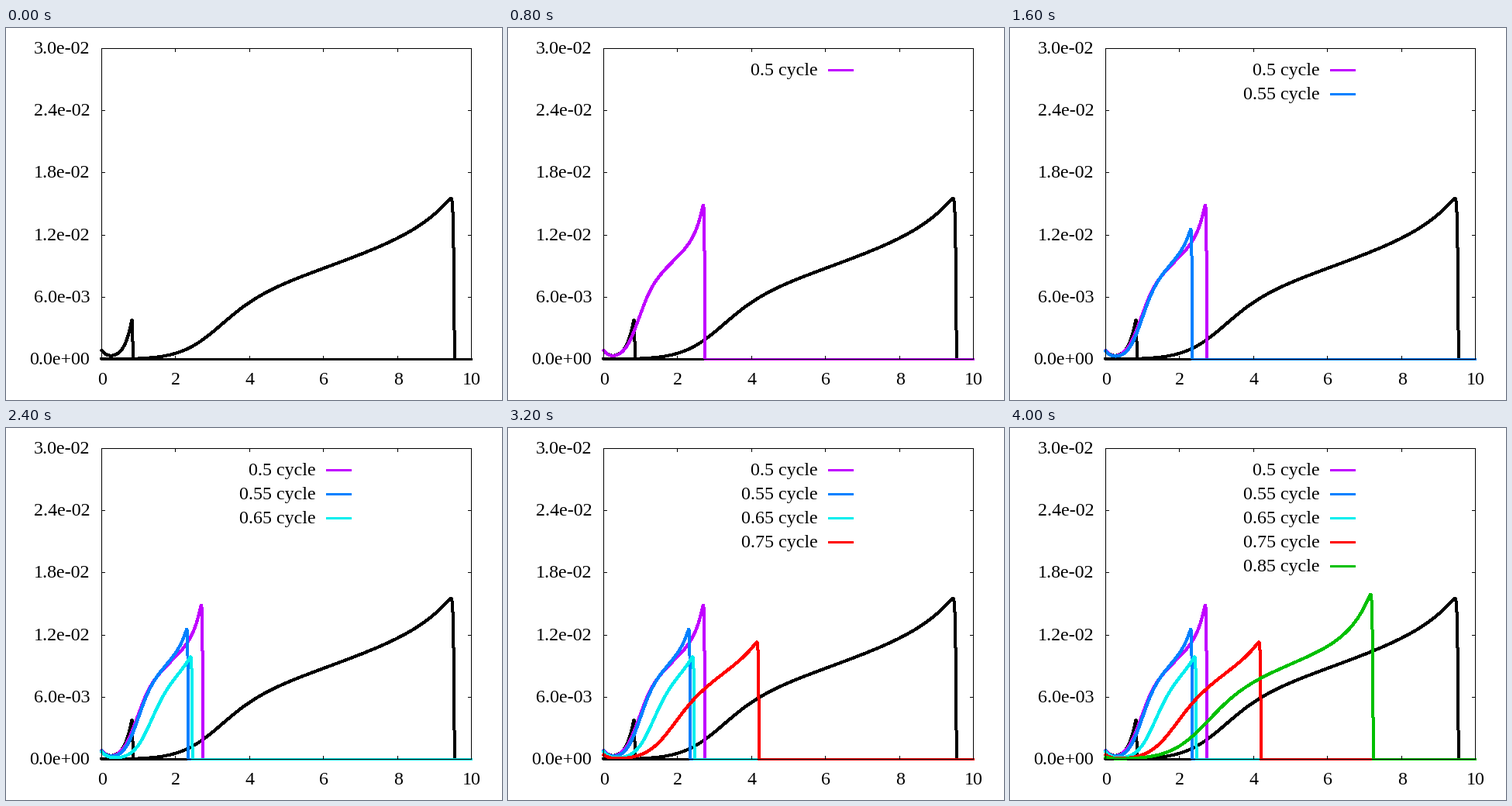
A matplotlib script for the animation above (4.8 s loop, 640x480 px).

```python
import numpy as np
import matplotlib.pyplot as plt
from matplotlib.animation import FuncAnimation

W, H, DPI = 640, 480, 80
PT = 72 / DPI                                   # points per pixel
LEFT, RIGHT, TOP, BASE = 123, 600, 26, 427      # plot box in pixels
X_MAX, Y_MAX = 10, 30                           # y in thousandths
EM = 24

# Advance widths in em, used to align labels; digits and "y" are 0.5.
ADVANCE = {".": 0.25, " ": 0.25, "e": 0.444, "c": 0.444, "l": 0.278,
           "-": 0.333, "+": 0.564}


def profile(x, start, level, slope, steep, centre, crest, reach, front):
    """Decay at the wall, a logistic step onto a ramp, a crest, a sharp front."""
    wall = start * np.exp(-x / 0.155)
    ramp = (level + slope * x) / (1 + np.exp(-steep * (x - centre)))
    peak = crest * np.exp((np.minimum(x, front) - front) / reach)
    edge = np.tanh(np.maximum(front - x, 0) / (0.012 + 0.0022 * front))
    return (wall + ramp + peak) * edge


BLACK = [(0.80, 0, 0, 1, 0, 4.5, 0.192, 0.845),
         (0, 1.57, 1.2, 1.8, 2.98, 3.05, 0.88, 9.545)]
CYCLES = [
    ("0.5 cycle", "#c000ff", (0.80, 3.85, 3, 5.0, 0.877, 3.95, 0.2, 2.74)),
    ("0.55 cycle", "#0080ff", (0.78, 3.9, 3, 5.1, 0.925, 2.35, 0.2, 2.345)),
    ("0.65 cycle", "#00eeee", (0.72, 2.15, 3, 4.15, 1.235, 0.84, 0.2, 2.455)),
    ("0.75 cycle", "#ff0000", (0.42, 1.2, 2.2, 2.7, 1.70, 1.27, 0.38, 4.205)),
    ("0.85 cycle", "#00c000", (0.20, 2.7, 1.3, 1.95, 2.58, 4.66, 0.52, 7.24)),
]

fig = plt.figure(figsize=(W / DPI, H / DPI), dpi=DPI, facecolor="white")
ax = fig.add_axes([0, 0, 1, 1])
ax.set_xlim(-0.5, W - 0.5)                      # integers are pixel centres
ax.set_ylim(H - 0.5, -0.5)
ax.axis("off")


def stroke(x, y, color="black", width=3, cap="projecting", z=2):
    return ax.plot(x, y, color=color, lw=width * PT, antialiased=False,
                   snap=False, solid_capstyle=cap, solid_joinstyle="round",
                   zorder=z)[0]


def thin(x, y):
    stroke(x, y, width=1, z=20)


def curve(params, color="black", z=2):
    x = np.linspace(0, X_MAX, 4001)
    y = profile(x, *params)
    return stroke(LEFT + x / X_MAX * (RIGHT - LEFT),
                  BASE - y / Y_MAX * (BASE - TOP), color, z=z)


def label(x, y, text, align):
    """Text centred on y; align is the share of its width left of x."""
    width = EM * sum(ADVANCE.get(c, 0.5) for c in text)
    return ax.text(x - align * width, y + 6.7, text, ha="left", va="baseline",
                   fontsize=EM * PT, family="Liberation Serif", color="black")


def draw_box():
    thin([LEFT, RIGHT, RIGHT, LEFT, LEFT], [TOP, TOP, BASE, BASE, TOP])
    for i in range(6):
        x = round(LEFT + (RIGHT - LEFT) * i / 5)
        y = round(BASE - (BASE - TOP) * i / 5)
        thin([x, x], [TOP, TOP + 4])
        thin([x, x], [BASE, BASE - 4])
        thin([LEFT, LEFT + 4], [y, y])
        thin([RIGHT, RIGHT - 4], [y, y])
        label(x + 0.2, 453, str(2 * i), 0.5)
        label(108.1, y, f"{0.006 * i:.1e}", 1)


draw_box()
for params in BLACK:
    curve(params)

groups = []
for k, (name, color, params) in enumerate(CYCLES):
    y = 54 + 31 * k
    groups.append([curve(params, color, z=3 + k),
                   stroke([412.5, 445.5], [y, y], color, cap="butt"),
                   label(399.1, y, name, 1)])


def update(n):
    for k, group in enumerate(groups):
        for artist in group:
            artist.set_visible(k < n)
    return [artist for group in groups for artist in group]


anim = FuncAnimation(fig, update, frames=len(CYCLES) + 1, interval=800,
                     init_func=lambda: update(0), repeat=True, repeat_delay=0)
plt.show()
```
